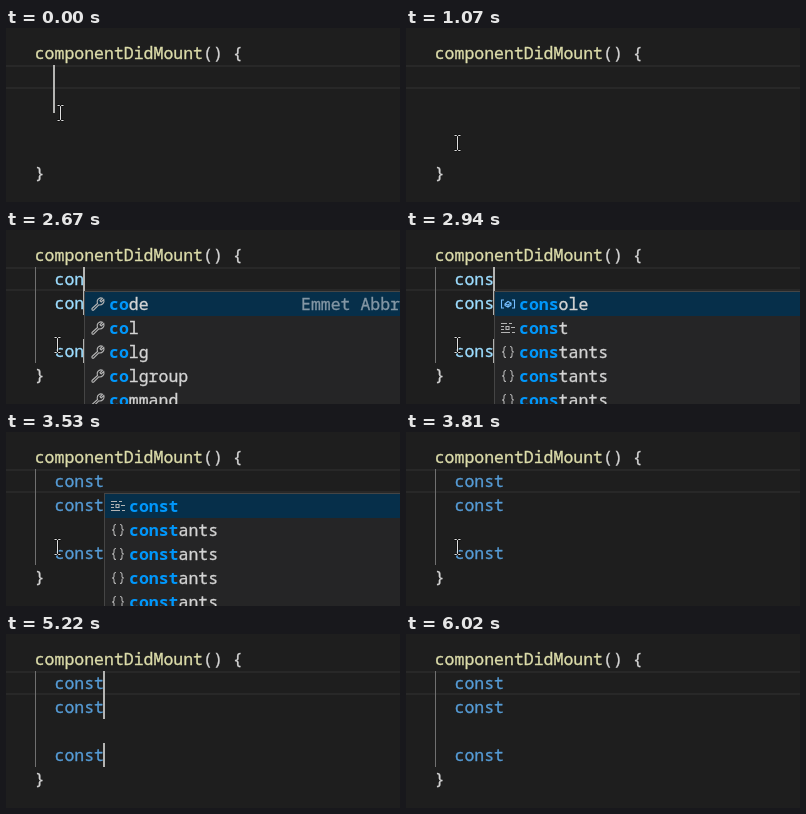
Animation, 394 px wide and 174 px high, one loop 6.12 s. Source, as an HTML page:

```html
<!DOCTYPE html>
<html lang="en">
<head>
<meta charset="utf-8">
<title>Multi-cursor typing</title>
<style>
  html, body { margin: 0; width: 100%; height: 100%; overflow: hidden; background: #1e1e1e; }
  svg { display: block; width: 394px; height: 174px; }
  text {
    font: 16.5px "Noto Sans Mono", "DejaVu Sans Mono", monospace;
    white-space: pre; color: #d4d4d4;
  }
  text, tspan { fill: currentColor; stroke: currentColor; stroke-width: .3; }
  .fn { color: #dcdcaa; }
  .name { color: #9cdcfe; }
  .keyword { color: #569cd6; }
  .match { color: #0097fb; font-weight: bold; stroke: none; }
  .hint { color: #8396a4; }
  .icon { fill: none; stroke: #b4b4b4; stroke-width: 1.1; }
  .icon.variable { stroke: #75beff; }
</style>
</head>
<body>
<svg viewBox="0 0 394 174">
  <rect width="394" height="174" fill="#1e1e1e"/>
  <path d="M0 38H394M0 60H394" stroke="#282828" stroke-width="2"/>
  <rect id="guide" x="29" y="37" width="1" height="96" fill="#707070"/>
  <text x="28.7" y="31"><tspan class="fn">componentDidMount</tspan>() {</text>
  <text x="28.7" y="151">}</text>
  <g id="words"></g>
  <g id="carets" fill="#b4b4b2"></g>
  <g id="popup"></g>
  <g id="mouse" fill="none">
    <path d="M-3.5 -7.5H-1.5L0 -6.5L1.5 -7.5H3.5M0 -6.5V6.5M-3.5 7.5H-1.5L0 6.5L1.5 7.5H3.5" stroke="#111" stroke-width="2.4"/>
    <path d="M-3 -7.5H-1L0 -6.5L1 -7.5H3M0 -6.5V6.5M-3 7.5H-1L0 6.5L1 7.5H3" stroke="#e0e0e0"/>
  </g>
</svg>
<script>
const LOOP = 6120, ADVANCE = 9.9, ROW = 24;
const LINES = [37, 61, 109];
const ICONS = {
  wrench: "M-6 4.5L-.5 -.5Q-1.5 -4 1 -5.5Q2.5 -6.5 4.5 -5.8L2 -3.2L3.2 -2L5.8 -4.5Q6.5 -2 5 -.5Q3 1.5 .8 .8L-4.5 6.2Q-6.5 6.5 -6 4.5Z",
  variable: "M-4 -4H-6.5V4H-4M4 -4H6.5V4H4M-3 0L0 -2.5L3 -1V1L0 3L-3 1.5ZM-3 0L0 1L3 -1M0 1V3",
  keyword: "M-7 -4.5H-1M1 -4.5H4M-7 -1.5H-4M-2 -1.5H1V1.5H-2ZM3 -.5H7M-7 1.5H-4M-7 4.5H2M4 4.5H7",
  braces: "M-2 -5.5Q-4 -5.5 -4 -3.5V-1.5Q-4 0 -6 0Q-4 0 -4 1.5V3.5Q-4 5.5 -2 5.5M2 -5.5Q4 -5.5 4 -3.5V-1.5Q4 0 6 0Q4 0 4 1.5V3.5Q4 5.5 2 5.5"
};
const tags = ["code", "col", "colg", "colgroup", "command"].map(s => [s, "wrench"]);
const constants = Array(4).fill(["constants", "braces"]);
const constRow = ["const", "keyword"];
const consoleRows = [["console", "variable"], constRow, ...constants.slice(1)];
const LISTS = {
  co: { rows: tags, match: 2, hint: "Emmet Abbreviation" },
  con: { rows: consoleRows, match: 3 },
  cons: { rows: consoleRows, match: 4 },
  const: { rows: [constRow, ...constants], match: 5 }
};

// Each step changes only the listed parts of the state.
const STEPS = [
  [0, { word: "", col: 0, carets: 2, list: null, mouse: [54.5, 85] }],
  [120, { mouse: [55.5, 99] }],
  [240, { carets: 0, mouse: [55.5, 111] }],
  [390, { mouse: [55.5, 117] }],
  [540, { carets: 3 }],
  [1070, { carets: 0, mouse: [51.5, 115] }],
  [1500, { carets: 3 }],
  [2030, { carets: 0 }],
  [2300, { word: "c", col: 1, carets: 3 }],
  [2550, { word: "co", col: 2 }],
  [2670, { word: "con", col: 3, list: "co" }],
  [2820, { list: "con" }],
  [2940, { word: "cons", col: 4, list: "cons" }],
  [3100, { word: "const", col: 5, list: "const" }],
  [3530, { carets: 0 }],
  [3810, { list: null }],
  [4120, { carets: 3 }],
  [4270, { mouse: [54.5, 115] }],
  [4550, { carets: 0 }],
  [4830, { col: 6, carets: 3, mouse: null }],
  [4950, { col: 5 }],
  [5070, { col: 3 }],
  [5220, { col: 5 }],
  [5340, { col: 6 }],
  [5870, { carets: 0 }]
];

const $ = id => document.getElementById(id);
const caretX = col => Math.round(47.3 + col * ADVANCE);

function popupMarkup(name, left) {
  const { rows, match, hint } = LISTS[name];
  const body = rows.map(([label, icon], i) => {
    const y = 62 + i * ROW;
    return `<path class="icon ${icon}" transform="translate(${left + 14} ${y + 12})" d="${ICONS[icon]}"/>
      <text x="${left + 25}" y="${y + 18}"><tspan class="match">${label.slice(0, match)}</tspan>${label.slice(match)}</text>`;
  }).join("");
  return `<rect x="${left + .5}" y="61.5" width="420" height="310" fill="#252526" stroke="#454545"/>
    <rect x="${left + 1}" y="62" width="419" height="${ROW}" fill="#062f4a"/>${body}` +
    (hint ? `<text class="hint" x="295" y="80">${hint}</text>` : "");
}

function draw(s) {
  const kind = s.word === "const" ? "keyword" : "name";
  $("guide").style.display = s.word ? "" : "none";
  $("words").innerHTML = s.word
    ? LINES.map(y => `<text class="${kind}" x="48.5" y="${y + 18}">${s.word}</text>`).join("") : "";
  $("carets").innerHTML = LINES.slice(0, s.carets)
    .map(y => `<rect x="${caretX(s.col)}" y="${y}" width="2" height="${ROW}"/>`).join("");
  $("popup").innerHTML = s.list ? popupMarkup(s.list, caretX(s.col) + 1) : "";
  $("mouse").style.display = s.mouse ? "" : "none";
  if (s.mouse) $("mouse").setAttribute("transform", `translate(${s.mouse})`);
}

let shown = -1;
const start = performance.now();
function tick() {
  const t = (performance.now() - start) % LOOP;
  const count = STEPS.filter(([at]) => at <= t).length;
  if (count !== shown) {
    shown = count;
    draw(Object.assign({}, ...STEPS.slice(0, count).map(([, change]) => change)));
  }
  requestAnimationFrame(tick);
}
tick();
</script>
</body>
</html>
```
